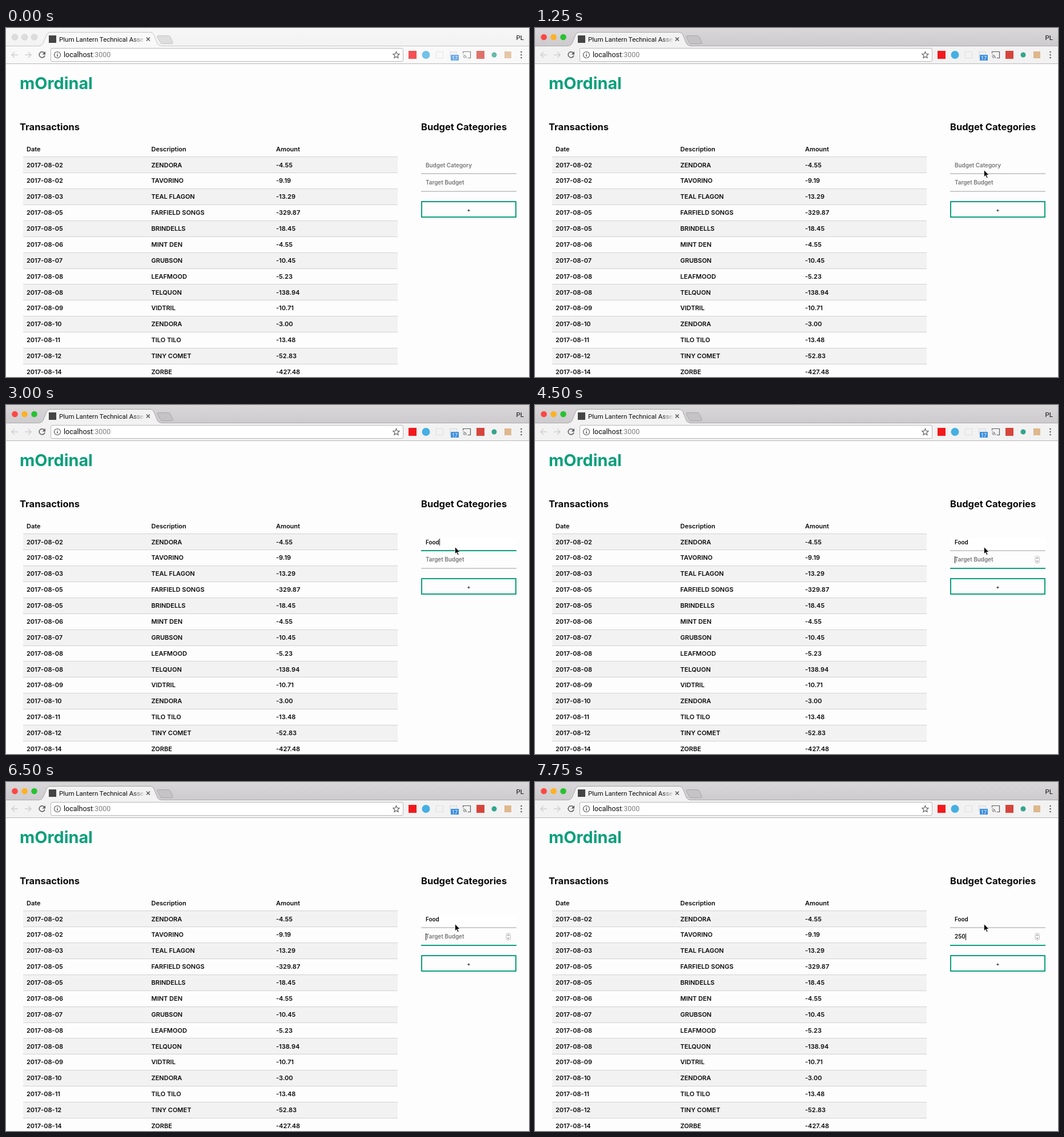
Animation, 916 px wide and 611 px high, one loop 8 s. Source, as an HTML page:

```html
<!DOCTYPE html>
<html lang="en">
<head>
<meta charset="utf-8">
<title>Budget page</title>
<style>
html, body { margin: 0; width: 100%; height: 100%; overflow: hidden; background: #fdfdfd; }
svg { display: block; --bar1: #f6f6f6; --bar2: #f3f3f3; --tool: #f9f9f9; --edge: #c4c4c4; --newtab: #dedede; }
svg.active { --bar1: #d9d7d9; --bar2: #cdcbcd; --tool: #f2f2f2; --edge: #a9a7a9; --newtab: #c5c3c5; }
text { font-family: Inter, sans-serif; font-weight: 600; font-size: 11px; fill: #0a0a0a; }
.ui { font-family: Roboto, sans-serif; font-weight: 400; font-size: 11.5px; fill: #0a0a0a; }
.brand { font-size: 28.8px; font-weight: 700; fill: #0a9f7b; }
.heading { font-size: 16.5px; font-weight: 700; }
.field { font-size: 9.9px; }
.light { fill: #dcdcdc; stroke: #cdcdcd; stroke-width: .7; }
.active .light { fill: var(--on); stroke: none; }
#icons { opacity: .75; }
.active #icons { opacity: 1; }
.line { fill: none; stroke-width: 1.5; }
</style>
</head>
<body>
<svg id="stage" width="916" height="611" viewBox="0 0 916 611">
  <defs>
    <linearGradient id="bar" x2="0" y2="1">
      <stop style="stop-color:var(--bar1)"/><stop offset="1" style="stop-color:var(--bar2)"/>
    </linearGradient>
    <linearGradient id="fade" gradientUnits="userSpaceOnUse" x1="222" x2="243">
      <stop stop-color="#fff"/><stop offset="1" stop-color="#000"/>
    </linearGradient>
    <mask id="titleMask"><rect x="90" y="8" width="153" height="22" fill="url(#fade)"/></mask>
  </defs>

  <!-- window frame -->
  <rect width="916" height="31" fill="url(#bar)"/>
  <rect y="31" width="916" height="31" style="fill:var(--tool)"/>
  <path d="M0 31.5H58Q63 31 65 27L71 12Q73 7.5 77 7.5H253Q257 7.5 259 12L265 27Q267 31 272 31.5H916V33H0Z" style="fill:var(--tool)"/>
  <path d="M0 31.5H58Q63 31 65 27L71 12Q73 7.5 77 7.5H253Q257 7.5 259 12L265 27Q267 31 272 31.5H916" fill="none" style="stroke:var(--edge)"/>
  <path d="M267 13.5H284Q287 13.5 288 16L292 25Q293 27.5 290 27.5H274Q271 27.5 270 25L265 16Q264 13.5 267 13.5Z" style="fill:var(--newtab);stroke:var(--edge)"/>
  <path d="M0 62.5H916" stroke="#b8b8b8"/>
  <circle class="light" cx="15.5" cy="16" r="5.3" style="--on:#fc4743"/>
  <circle class="light" cx="32.5" cy="16" r="5.3" style="--on:#fdb124"/>
  <circle class="light" cx="49.5" cy="16" r="5.3" style="--on:#28c231"/>
  <rect x="75" y="13" width="13" height="13" fill="#444"/>
  <g mask="url(#titleMask)"><text class="ui" x="93" y="23.5">Plum Lantern Technical Assessment</text></g>
  <path class="line" d="M246 16.5l6 6m0-6l-6 6" stroke="#555"/>
  <text class="ui" x="893.5" y="20.5">PL</text>

  <!-- toolbar -->
  <path class="line" d="M21 47H10m5-5l-5 5 5 5M33 47h11m-5-5l5 5-5 5" stroke="#d0d0d0"/>
  <path class="line" d="M67 43.5A5 5 0 1 0 68 48" stroke="#5c5c5c"/>
  <path d="M69 41v5.5h-5.5Z" fill="#5c5c5c"/>
  <rect x="78.5" y="35.5" width="617" height="23" rx="2.5" fill="#fff" stroke="#b7b7b7"/>
  <circle cx="90" cy="47" r="5.5" fill="none" stroke="#555" stroke-width="1.2"/>
  <path class="line" d="M90 46v4M90 43.5v1.3" stroke="#555"/>
  <text class="ui" x="101" y="51" style="font-size:12.5px">localhost<tspan fill="#808080">:3000</tspan></text>
  <path d="M683.5 41.5l1.6 3.7 4 .4-3 2.7.9 4-3.5-2.1-3.5 2.1.9-4-3-2.7 4-.4Z" fill="none" stroke="#5c5c5c" stroke-width="1.1"/>
  <g id="icons">
    <rect x="705" y="40" width="14" height="14" fill="#f2191c"/>
    <circle cx="735.5" cy="47" r="7" fill="#45afe2"/>
    <rect x="753.5" y="41.5" width="12" height="11" fill="none" stroke="#dedede"/>
    <rect x="777.5" y="41.5" width="12" height="10" fill="#eee" stroke="#d9d9d9"/>
    <rect x="779" y="47" width="14" height="10" fill="#3b8fe0"/>
    <text class="ui" x="786" y="55.5" text-anchor="middle" style="font-size:9px;fill:#fff">17</text>
    <path d="M800.5 44.5v-3h13v11h-5M800.5 47a5.5 5.5 0 0 1 5.5 5.5M800.5 50a2.5 2.5 0 0 1 2.5 2.5" fill="none" stroke="#5c5c5c" stroke-width="1.2"/>
    <rect x="824" y="40" width="14" height="14" fill="#d6453c"/>
    <circle cx="855" cy="47" r="4.5" fill="#35a58c"/>
    <rect x="873" y="41" width="12" height="12" fill="#dfb78c"/>
  </g>
  <path d="M902.5 42h.01M902.5 47h.01M902.5 52h.01" stroke="#5c5c5c" stroke-width="2.6" stroke-linecap="round"/>

  <!-- page -->
  <text class="brand" x="24" y="106.5">mOrdinal</text>
  <text class="heading" x="24" y="179">Transactions</text>
  <text class="heading" x="727" y="179">Budget Categories</text>
  <g id="table"></g>

  <!-- form -->
  <rect id="bg0" x="727" y="234" width="167" height="20" fill="#fff"/>
  <rect id="line0" x="727" y="254" width="167" height="2"/>
  <rect id="line1" x="727" y="285" width="167" height="2"/>
  <text class="field" id="text0" x="735" y="243.5"></text>
  <text class="field" id="text1" x="735" y="274"></text>
  <g id="spinner" fill="none" stroke="#555">
    <rect x="876" y="264.5" width="7.5" height="12.5" rx="3.5" fill="#fff" stroke="#bbb"/>
    <path d="M878 269l1.7-2 1.7 2M878 272.5l1.7 2 1.7-2"/>
  </g>
  <rect x="728" y="304" width="165" height="27" fill="none" stroke="#0a9f7b" stroke-width="2"/>
  <text class="field" x="810.5" y="321.5" text-anchor="middle" style="font-size:9px;font-weight:500">+</text>
  <rect id="caret" width="1" height="12" fill="#111"/>
  <path id="cursor" d="M0 0V12.5L2.8 9.8 4.8 14.3 6.8 13.4 4.8 9H8.8Z" stroke="#fff" stroke-width=".9"/>
</svg>
<script>
const LOOP = 8000, GREEN = '#0a9f7b', GREY = '#cccccc';
const el = id => document.getElementById(id);
const show = (node, on) => node.setAttribute('visibility', on ? 'visible' : 'hidden');

const rows = `02 ZENDORA -4.55
02 TAVORINO -9.19
03 TEAL FLAGON -13.29
05 FARFIELD SONGS -329.87
05 BRINDELLS -18.45
06 MINT DEN -4.55
07 GRUBSON -10.45
08 LEAFMOOD -5.23
08 TELQUON -138.94
09 VIDTRIL -10.71
10 ZENDORA -3.00
11 TILO TILO -13.48
12 TINY COMET -52.83
14 ZORBE -427.48`.split('\n').map(row => {
  const [, day, name, amount] = row.match(/^(\d+) (.+) (\S+)$/);
  return ['2017-08-' + day, name, amount];
});
const cells = (row, y) => row.map((s, i) => `<text x="${36 + 218.5 * i}" y="${y}">${s}</text>`).join('');
el('table').innerHTML = cells(['Date', 'Description', 'Amount'], 216) + rows.map((row, i) => {
  const y = 225.9 + 27.88 * i, top = Math.floor(y);
  return `<rect x="30" y="${top}" width="656" height="28" fill="${i % 2 ? '#fdfdfd' : '#f2f2f2'}"/>` +
    `<rect x="30" y="${top}" width="656" height="1" fill="#d2d2d2"/>` + cells(row, Math.floor(y + 18.1));
}).join('');

// time, focused field, text of both fields
const input = [
  [0, -1, '', ''], [1750, 0, '', ''], [2500, 0, 'F', ''], [2750, 0, 'Fo', ''], [3000, 0, 'Food', ''],
  [3500, 1, 'Food', ''], [6750, 1, 'Food', '2'], [7500, 1, 'Food', '25'], [7750, 1, 'Food', '250']
];
// time, tip of the pointer
const pointer = [[500, 796.5, 285.5], [750, 789.5, 255], [1000, 786.3, 248.5]];
const labels = ['Budget Category', 'Target Budget'];
const latest = (list, t) => list.filter(step => step[0] <= t).pop();

function draw(t) {
  const [since, focus, ...values] = latest(input, t);
  el('stage').classList.toggle('active', t >= 1250);

  values.forEach((value, i) => {
    const text = el('text' + i);
    text.textContent = value || labels[i];
    text.style.fill = value ? '#0a0a0a' : '#757575';
    const fading = i === 0 && focus === 0 && t < 2000;
    el('line' + i).setAttribute('fill', fading ? '#55b097' : focus === i ? GREEN : GREY);
  });
  show(el('bg0'), t >= 1750 && t < 7500);
  show(el('spinner'), focus === 1);

  const blinkOn = Math.floor((t - since) / 500) % 2 === 0;
  show(el('caret'), focus >= 0 && blinkOn);
  if (focus >= 0) {
    const width = values[focus] ? el('text' + focus).getComputedTextLength() : 0;
    el('caret').setAttribute('x', Math.round(735 + width));
    el('caret').setAttribute('y', 234 + 31 * focus);
  }

  const tip = latest(pointer, t);
  show(el('cursor'), tip);
  if (tip) el('cursor').setAttribute('transform', `translate(${tip[1]} ${tip[2]})`);
}

const start = performance.now();
function tick() {
  draw((performance.now() - start) % LOOP);
  requestAnimationFrame(tick);
}
tick();
</script>
</body>
</html>
```
